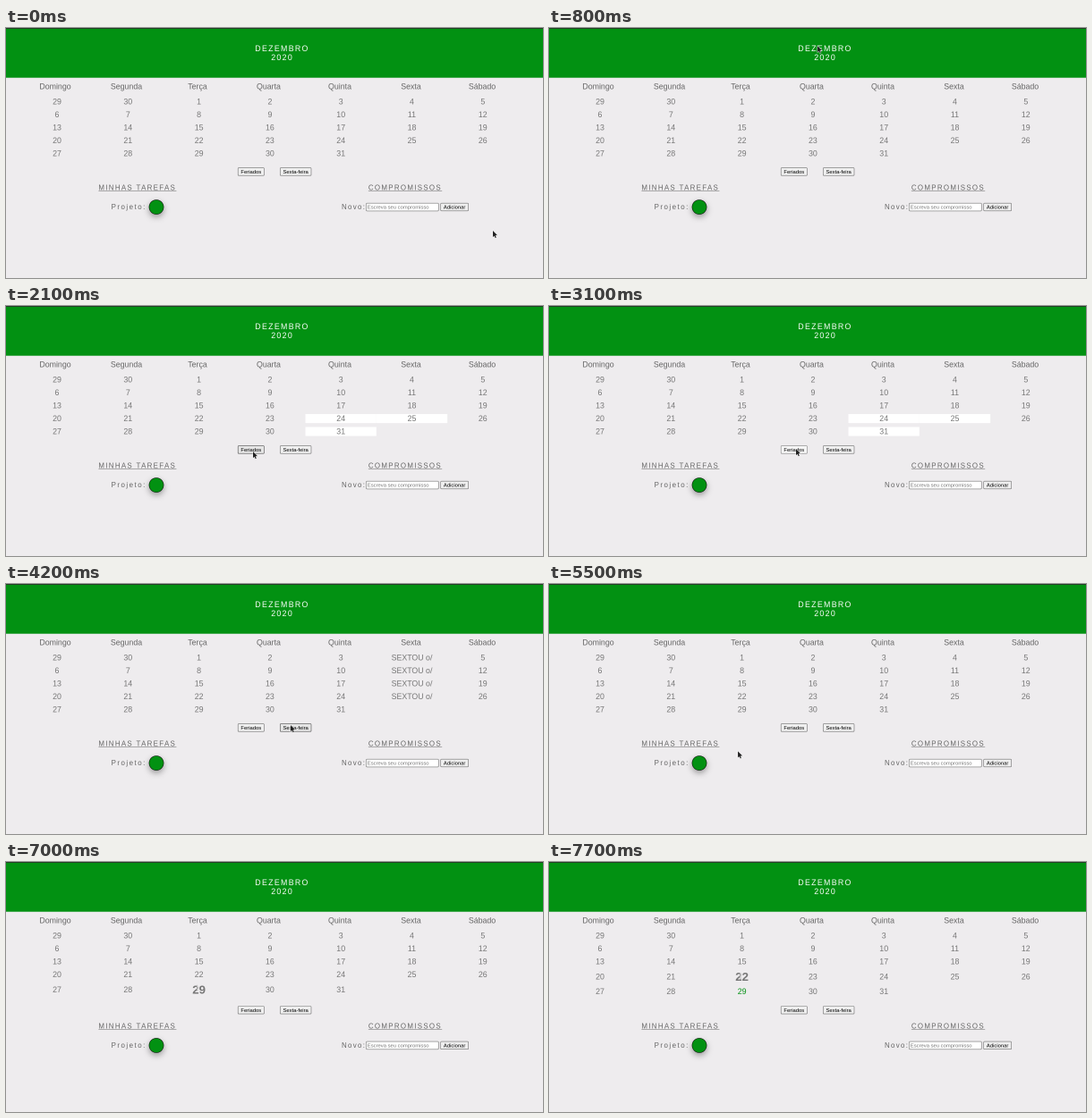
These frames come from a looping animation (600 px wide and 280 px high, 8000 ms). An HTML page with a canvas:

```html
<!DOCTYPE html>
<html lang="pt">
<head>
<meta charset="utf-8">
<title>Dezembro 2020</title>
<style>
html, body { margin: 0; width: 100%; height: 100%; overflow: hidden; background: #eeecee; }
canvas { display: block; width: 600px; height: 280px; }
</style>
</head>
<body>
<canvas id="stage"></canvas>
<script>
const canvas = document.getElementById('stage');
const ctx = canvas.getContext('2d');
// Drawn at double size so small text keeps fractional positions
const scale = 2 * (window.devicePixelRatio || 1);
canvas.width = 600 * scale;
canvas.height = 280 * scale;

const LOOP = 8000, STEP = 100;
const GREEN = '#029112', BG = '#eeecee', GREY = '#777', DARK = '#666';
const WEEK = ['Domingo', 'Segunda', 'Terça', 'Quarta', 'Quinta', 'Sexta', 'Sábado'];
const HOLIDAYS = [24, 25, 31];
const COL = 79.3, ROW = 14.5, LINE = 10.1, GROW = 4.9;

const START = { x: 544, y: 227 };
const MOVES = [
  { from: 300, to: 800, x: 300, y: 20 },
  { from: 800, to: 900, x: 160, y: 70 },
  { from: 900, to: 1200, x: 291, y: 168 },
  { from: 1200, to: 1500, x: 276, y: 163 },
  { from: 2400, to: 2600, x: 294, y: 161 },
  { from: 2700, to: 2900, x: 276, y: 160 },
  { from: 3200, to: 3600, x: 318, y: 158 },
  { from: 5300, to: 6200, x: 168.5, y: 199 },
  { from: 6600, to: 7200, x: 214, y: 141 },
  { from: 7400, to: 7700, x: 214, y: 128 }
];

const within = (t, a, b) => t >= a && t < b;
const easeOut = k => 1 - (1 - k) ** 5;

function pointerAt(t) {
  let { x, y } = START;
  for (const m of MOVES) {
    if (t <= m.from) break;
    const k = easeOut(Math.min(1, (t - m.from) / (m.to - m.from)));
    x += (m.x - x) * k;
    y += (m.y - y) * k;
  }
  return { x, y };
}

function text(str, x, y, size, color, { align = 'left', spacing = 0, bold = false } = {}) {
  ctx.font = `${bold ? 'bold ' : ''}${size}px "Liberation Sans", Arial, sans-serif`;
  ctx.letterSpacing = spacing + 'px';
  ctx.textAlign = align;
  ctx.fillStyle = color;
  ctx.fillText(str, x, y);
}

function disc(x, y, r, color) {
  ctx.beginPath();
  ctx.arc(x, y, r, 0, Math.PI * 2);
  ctx.fillStyle = color;
  ctx.fill();
}

function box(x, y, w, h, fill, stroke) {
  ctx.beginPath();
  ctx.roundRect(x + 0.3, y + 0.3, w - 0.6, h - 0.6, 1);
  ctx.fillStyle = fill;
  ctx.fill();
  ctx.lineWidth = 0.6;
  ctx.strokeStyle = stroke;
  ctx.stroke();
}

function button(label, x, y, w, p, pressed) {
  const over = p.x >= x && p.x <= x + w && p.y >= y && p.y <= y + 9.2;
  const [fill, stroke] = pressed ? ['#f5f5f5', '#858585']
    : over ? ['#e5e5e5', '#505050'] : ['#efefef', '#707070'];
  box(x, y, w, 9.2, fill, stroke);
  text(label, x + w / 2, y + 6.6, 5.86, '#000', { align: 'center' });
}

function heading(str, x, y, w) {
  text(str, x, y, 7.9, DARK, { spacing: 1.32 });
  ctx.fillRect(x, y + 0.7, w, 0.5);
}

function header() {
  ctx.fillStyle = GREEN;
  ctx.fillRect(0, 0, 600, 55.7);
  ctx.fillStyle = '#2b2b2b';
  ctx.fillRect(0, 0, 600, 0.8);
  text('DEZEMBRO', 278.3, 26, 8.8, '#fff', { spacing: 1.32 });
  text('2020', 296.2, 36.2, 8.8, '#fff', { spacing: 1.32 });
}

function calendar(t, zoomed) {
  const holidays = within(t, 2100, 3300);
  const fridays = within(t, 4200, 5100);
  WEEK.forEach((name, i) => text(name, 55 + i * 79.5, 68.6, 8.8, DARK, { align: 'center' }));

  const zoomRow = zoomed ? Math.floor((zoomed + 1) / 7) : Infinity;
  for (let i = 0; i < 33; i++) {
    const december = i > 1;
    const day = december ? i - 1 : 29 + i;
    const row = Math.floor(i / 7), col = i % 7;
    const x = 57 + col * COL;
    const dy = row > zoomRow ? GROW : row === zoomRow ? GROW / 2 : 0;
    const base = 85.3 + row * ROW + dy;
    if (holidays && december && HOLIDAYS.includes(day)) {
      ctx.fillStyle = '#fff';
      ctx.fillRect(x - COL / 2, base - 7.8, COL, LINE);
    }
    const big = december && day === zoomed;
    const label = fridays && col === 5 ? 'SEXTOU o/' : String(day);
    const color = december && day === 29 && t >= 7400 ? GREEN : GREY;
    text(label, x, base + (big ? 1.5 : 0), big ? 13.2 : 8.8, color, { align: 'center', bold: big });
  }
}

function task(p, dy) {
  const over = Math.hypot(p.x - 168, p.y - 200.5 - dy) < 9.5;
  const r = over ? 10.6 : 8.35;
  const cy = 192.2 + r + dy;
  text('Projeto:', over ? 115.4 : 117.6, (over ? 205.2 : 203) + dy, 7.9, DARK, { spacing: 1.5 });

  ctx.save();
  ctx.shadowColor = over ? 'rgba(0,255,70,0.9)' : 'rgba(0,0,0,0.35)';
  ctx.shadowBlur = 7 * scale;
  ctx.shadowOffsetY = (over ? 2 : 3) * scale;
  disc(168, cy, r, '#000');
  ctx.restore();
  disc(168, cy, r - 0.5, GREEN);
}

function arrow({ x, y }) {
  const shape = [[0, 0], [0, 7.2], [1.6, 5.8], [2.7, 8.2], [3.8, 7.7], [2.8, 5.3], [5, 5.1]];
  ctx.beginPath();
  shape.forEach(([a, b]) => ctx.lineTo(x + a, y + b));
  ctx.closePath();
  ctx.lineWidth = 0.9;
  ctx.lineJoin = 'round';
  ctx.strokeStyle = 'rgba(255,255,255,0.85)';
  ctx.stroke();
  ctx.fillStyle = '#222';
  ctx.fill();
}

function textCursor({ x, y }) {
  for (const [color, width] of [['#eee', 1.3], ['#777', 0.4]]) {
    ctx.beginPath();
    ctx.moveTo(x, y - 3.5);
    ctx.lineTo(x, y + 3.5);
    ctx.strokeStyle = color;
    ctx.lineWidth = width;
    ctx.stroke();
  }
}

function draw(t) {
  const p = pointerAt(t);
  const zoomed = t >= 7500 ? 22 : t >= 6900 ? 29 : 0;
  const dy = zoomed ? GROW : 0;

  ctx.setTransform(scale, 0, 0, scale, 0, 0);
  ctx.fillStyle = BG;
  ctx.fillRect(0, 0, 600, 280);
  header();
  calendar(t, zoomed);

  button('Feriados', 258.9, 156.3 + dy, 29.8, p, within(t, 1900, 2100) || within(t, 3100, 3300));
  button('Sexta-feira', 306, 156.3 + dy, 35.3, p, within(t, 4100, 4200) || within(t, 5000, 5100));

  heading('MINHAS TAREFAS', 103.4, 181.5 + dy, 87);
  heading('COMPROMISSOS', 404.9, 181.5 + dy, 82.3);
  task(p, dy);

  text('Novo:', 375, 203 + dy, 7.9, DARK, { spacing: 1.32 });
  box(402.2, 195.9 + dy, 81.4, 9.3, '#fff', '#767676');
  text('Escreva seu compromisso', 403.8, 202.5 + dy, 5.86, GREY);
  button('Adicionar', 485.4, 195.9 + dy, 31.5, p, false);

  if (zoomed) textCursor(p);
  else arrow(p);
}

function frame(now) {
  draw(Math.floor((now % LOOP) / STEP) * STEP);
  requestAnimationFrame(frame);
}
draw(0);
requestAnimationFrame(frame);
</script>
</body>
</html>
```
